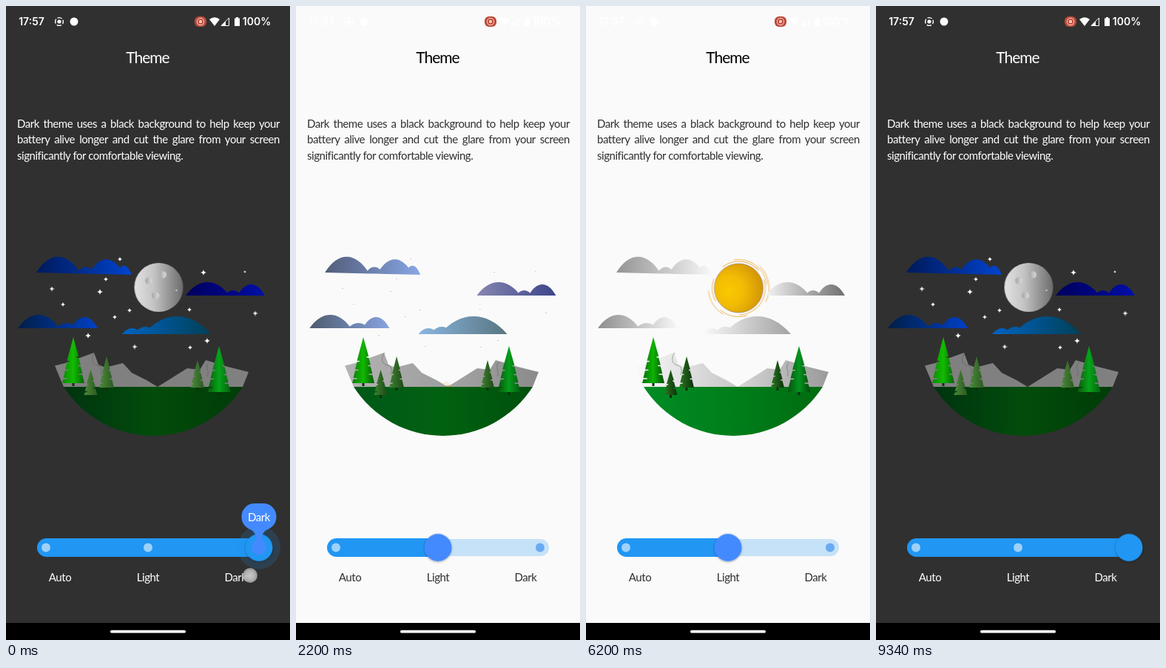
An HTML page that plays this animation: 384x854 px, repeating every 9540 ms.

```html
<!DOCTYPE html>
<html lang="en">
<head>
<meta charset="utf-8">
<title>Theme</title>
<style>
@property --theme { syntax: '<percentage>'; inherits: true; initial-value: 0%; }
@property --text { syntax: '<percentage>'; inherits: true; initial-value: 0%; }
@property --day { syntax: '<percentage>'; inherits: true; initial-value: 0%; }
@property --land { syntax: '<percentage>'; inherits: true; initial-value: 0%; }
@property --drift { syntax: '<number>'; inherits: true; initial-value: 0; }
@property --x { syntax: '<number>'; inherits: true; initial-value: 342; }
@property --press { syntax: '<number>'; inherits: true; initial-value: 0; }

html, body { margin: 0; width: 100%; height: 100%; overflow: hidden; }
#stage {
  --ink: color-mix(in srgb, #303030 var(--text), #fff);
  position: relative; width: 100%; height: 100%; overflow: hidden;
  background: color-mix(in srgb, #fafafa var(--theme), #303030);
  font: 15px Lato, 'Open Sans', sans-serif; letter-spacing: -.45px;
}
#stage, .loop { animation-duration: 9540ms; animation-timing-function: linear; animation-iteration-count: infinite; }
#stage { animation-name: theme, text, day, land, drift, slide, press; }
svg { position: absolute; left: 0; top: 0; width: 384px; height: 854px; }
svg text { text-anchor: middle; }
p { position: absolute; left: 15px; top: 148px; width: 355px; margin: 0; line-height: 21.4px; color: var(--ink); }
p span { display: block; white-space: nowrap; }
p span:not(:last-child) { text-align: justify; text-align-last: justify; }
.sky stop { stop-color: color-mix(in srgb, var(--d) var(--day), var(--n)); }
.land stop { stop-color: color-mix(in srgb, var(--d) var(--land), var(--n)); }
.title { font-size: 21px; letter-spacing: -1px; fill: color-mix(in srgb, #000 var(--theme), #fff); }
.label { fill: var(--ink); }
.status { font: 600 14px Inter, Roboto, sans-serif; letter-spacing: 0; }
.cloud { transform: translateX(calc(var(--drift) * var(--dx))); }
.active { width: calc((var(--x) - 42) * 1px); }
.knob { transform: translate(calc(var(--x) * 1px), 729.5px); }
.halo { opacity: calc(var(--press) * .17); transform: scale(var(--press)); }
.paddle { transform: scale(var(--press)); }
.disc { fill: color-mix(in srgb, #448aff var(--theme), #2196f3); filter: drop-shadow(0 1px 1.5px rgba(0,0,0,.3)); animation-name: disc; }
.sun { animation-name: sun; }
.moon { animation-name: moon; }
.star { animation-name: star; }
.star.early { animation-name: early; }
.fleck { animation-name: fleck; }
.at-dark { animation-name: at-dark; }
.at-light { animation-name: at-light; }
.at-dark, .at-light { animation-timing-function: step-end; }
.touch { animation-name: touch-place; animation-timing-function: step-end; }
.touch circle { animation-name: touch-show; }

@keyframes theme {
  0%, 10.69% { --theme: 0%; }
  12.79%, 66.7% { --theme: 100%; }
  68.79%, 100% { --theme: 0%; }
}
@keyframes text {
  0%, 10.69% { --text: 0%; }
  11.95% { --text: 18%; }
  13% { --text: 45%; }
  14.88%, 66.7% { --text: 100%; }
  68.55% { --text: 96%; }
  71.07%, 100% { --text: 0%; }
}
@keyframes day {
  0%, 11.11% { --day: 0%; }
  23.06% { --day: 55%; }
  33%, 67.01% { --day: 100%; }
  81.76% { --day: 86%; }
  94%, 100% { --day: 0%; }
}
@keyframes land {
  0%, 11.11% { --land: 0%; }
  23.06% { --land: 42%; }
  35%, 67.01% { --land: 100%; }
  81.76% { --land: 68%; }
  94%, 100% { --land: 0%; }
}
@keyframes drift {
  0%, 11.11% { --drift: 0; }
  23.06% { --drift: .17; }
  27.78% { --drift: 1.8; }
  40.36%, 67.01% { --drift: 0; }
  68.55% { --drift: .03; }
  75.47% { --drift: .33; }
  81.76% { --drift: 1; }
  84.49% { --drift: 1.75; }
  85.95% { --drift: 1.3; }
  96.44%, 100% { --drift: 0; }
}
@keyframes slide {
  0%, 9.01% { --x: 342; }
  9.8%, 65.9% { --x: 192; }
  66.7%, 100% { --x: 342; }
}
@keyframes press {
  0%, .73% { --press: 1; }
  1.9%, 7.97% { --press: 0; }
  9.01%, 13% { --press: 1; }
  14.26%, 65.3% { --press: 0; }
  66.3%, 69.6% { --press: 1; }
  70.86%, 100% { --press: 0; }
}
@keyframes disc {
  0%, 65.5% { transform: scale(1); }
  66.3%, 69% { transform: scale(0); }
  70.5%, 100% { transform: scale(1); }
}
@keyframes sun {
  0%, 21.8% { transform: translate(206.5px, 540px) scale(.5) rotate(-125deg); }
  40.36%, 67.01% { transform: translate(206.5px, 380px) scale(1) rotate(0deg); }
  87.46%, 100% { transform: translate(206.5px, 540px) scale(.5) rotate(-125deg); }
}
@keyframes moon {
  0%, 11.11% { transform: translate(206.5px, 379px) scale(1); }
  23.06%, 85.95% { transform: translate(206.5px, 540px) scale(.5); }
  97.2%, 100% { transform: translate(206.5px, 379px) scale(1); }
}
@keyframes star {
  0%, 11.11% { opacity: 1; }
  23.06% { opacity: .6; }
  28%, 76% { opacity: 0; }
  81.76% { opacity: .35; }
  92%, 100% { opacity: 1; }
}
@keyframes early {
  0%, 11.11% { opacity: 1; }
  23.06% { opacity: .6; }
  28%, 76% { opacity: 0; }
  81.76% { opacity: .85; }
  86%, 100% { opacity: 1; }
}
@keyframes fleck {
  0%, 10.69% { opacity: 0; }
  12.79%, 66.7% { opacity: 1; }
  68.79%, 100% { opacity: 0; }
}
@keyframes at-dark {
  0% { visibility: visible; }
  9.4% { visibility: hidden; }
  66.3%, 100% { visibility: visible; }
}
@keyframes at-light {
  0% { visibility: hidden; }
  9.4% { visibility: visible; }
  66.3%, 100% { visibility: hidden; }
}
@keyframes touch-place {
  0% { transform: translate(330px, 767px); }
  4% { transform: translate(193px, 771px); }
  40%, 100% { transform: translate(351px, 748px); }
}
@keyframes touch-show {
  0%, .73% { opacity: .85; }
  1.5%, 7.1% { opacity: 0; }
  7.4%, 13% { opacity: .9; }
  13.7%, 65% { opacity: 0; }
  65.3%, 69.3% { opacity: .9; }
  70%, 100% { opacity: 0; }
}
</style>
</head>
<body>
<div id="stage">
<svg viewBox="0 0 384 854">
  <defs>
    <g id="sky" class="sky"></g>
    <g id="land" class="land"></g>
    <linearGradient id="moonFill">
      <stop offset="0" stop-color="#e2e2e2"/><stop offset=".4" stop-color="#c4c4c4"/><stop offset="1" stop-color="#6c6c6c"/>
    </linearGradient>
    <linearGradient id="crater">
      <stop offset="0" stop-color="#a4a4a4"/><stop offset="1" stop-color="#dcdcdc"/>
    </linearGradient>
    <radialGradient id="sunFill" cx=".3" cy=".55" r=".75">
      <stop offset="0" stop-color="#f9c900"/><stop offset=".4" stop-color="#f2bc04"/><stop offset="1" stop-color="#cf9006"/>
    </radialGradient>
    <radialGradient id="touchFill">
      <stop offset="0" stop-color="#e4e4e4"/><stop offset=".65" stop-color="#cacaca"/><stop offset="1" stop-color="#a2a2a2"/>
    </radialGradient>
    <clipPath id="track"><rect x="42" y="717" width="300" height="25" rx="12.500"/></clipPath>
  </defs>

  <g fill="#fff" class="status">
    <text x="34.5" y="26">17:57</text>
    <circle cx="72" cy="21" r="5.4" fill="none" stroke="#fff" stroke-width="1.4" stroke-dasharray="6.4 2.08" stroke-dashoffset="3.2"/>
    <circle cx="72" cy="21" r="2.6"/>
    <circle cx="92" cy="21" r="5.5"/>
    <rect x="255" y="14" width="16" height="14" rx="6" fill="#bd4838"/>
    <circle cx="263" cy="21" r="4.6" fill="none" stroke="#f0c8be" stroke-width="1.1"/>
    <circle cx="263" cy="21" r="2.2" fill="#f0c8be"/>
    <path d="M275 18Q282 12.500 289 18L282 27Z"/>
    <path d="M301.500 16V26.500H291Z" fill="none" stroke="#fff"/>
    <path d="M297 20.500V26.500H291Z"/>
    <path d="M309 16.500h2v-1.500h3v1.500h2v10.500h-7z"/>
    <text x="339" y="26">100%</text>
  </g>
  <text class="title" x="191.500" y="76.500">Theme</text>

  <g id="stars"></g>
  <g class="loop sun">
    <g fill="none" stroke="#eeb550" stroke-width=".9">
      <circle r="36" pathLength="100" stroke-dasharray="14 9 24 6 30 17" transform="rotate(150)"/>
      <circle r="38.500" pathLength="100" stroke-dasharray="26 22 16 36" transform="rotate(-100)"/>
      <circle r="41" pathLength="100" stroke-dasharray="20 26 15 39" transform="rotate(-45)"/>
    </g>
    <circle r="33" fill="url(#sunFill)" stroke="#5a4668" stroke-opacity=".6" stroke-width=".7"/>
  </g>
  <g class="loop moon">
    <circle r="33" fill="url(#moonFill)"/>
    <g fill="url(#crater)"><circle cx="-13.500" cy="-9" r="4.800"/><circle cx="5.500" cy="-17" r="4.800"/><circle cx="-4.500" cy="11" r="5"/></g>
    <circle cx="24" cy="4" r="1" fill="#e8e8e8"/>
  </g>
  <g id="clouds"></g>

  <path fill="url(#hillL)" d="M66 484.500L80 481L119 467L125 483L134 487L158 481L170 494L190 504L205 513H78Z"/>
  <path fill="url(#hillR)" d="M205 513L245 488L262 490L270 477L300 486L328 493L320 513Z"/>
  <g fill="none" stroke="#555" stroke-width=".8" stroke-opacity=".6">
    <path d="M120 467C113 477 118 483 124 484S130 492 128 497"/>
    <path d="M274 480C268 487 276 492 272 499"/>
  </g>
  <path fill="url(#ground)" d="M78 513H320A144 144 0 0 1 78 513Z"/>
  <g id="trees"></g>

  <rect x="42" y="718" width="300" height="23" rx="11.500" fill="#2196f3" fill-opacity=".24"/>
  <g clip-path="url(#track)"><rect class="active" x="42" y="717" width="300" height="25" fill="#2196f3"/></g>
  <g fill="#fff" fill-opacity=".56">
    <circle cx="54" cy="729.500" r="6"/><circle cx="192" cy="729.500" r="6"/>
    <circle class="loop at-dark" cx="330" cy="729.500" r="6"/>
  </g>
  <circle class="loop at-light" cx="330" cy="729.500" r="6" fill="#2d84ee" fill-opacity=".6"/>
  <g class="label">
    <text x="73" y="774.500">Auto</text><text x="192" y="774.500">Light</text><text x="310.500" y="774.500">Dark</text>
  </g>
  <g class="knob">
    <circle class="halo" r="29" fill="#2196f3"/>
    <circle class="loop disc" r="18.500"/>
    <g class="paddle" fill="#448aff">
      <circle r="10"/>
      <path d="M-12 -25C-7 -22 -4 -18 -4 -13C-4 -10 -7 -8 -9 -4H9C7 -8 4 -10 4 -13C4 -18 7 -22 12 -25Z"/>
      <g class="loop at-dark"><rect x="-23.500" y="-59.500" width="47" height="36" rx="17.500"/><text y="-36" fill="#fff">Dark</text></g>
      <g class="loop at-light"><rect x="-25" y="-59.500" width="50" height="36" rx="17.500"/><text y="-36" fill="#fff">Light</text></g>
    </g>
  </g>
  <g class="loop touch"><circle class="loop" r="10" fill="url(#touchFill)"/></g>

  <rect y="831" width="384" height="23"/>
  <rect x="141" y="840.800" width="102" height="3.700" rx="1.850" fill="#fff"/>
</svg>
<p><span>Dark theme uses a black background to help keep your</span><span>battery alive longer and cut the glare from your screen</span><span>significantly for comfortable viewing.</span></p>
</div>
<script>
const put = (id, markup) => { document.getElementById(id).innerHTML = markup; };

// Each stop is a pair: night colour, day colour.
const tints = {
  sky: {
    cloudA: ['#001a5c #949494', '#0044d0 #f8f8f8'],
    cloudB: ['#00005c #f4f4f4', '#0010a8 #707070'],
    cloudC: ['#001e48 #8e8e8e', '#0040c8 #f8f8f8'],
    cloudD: ['#0064c4 #fafafa', '#004058 #a2a2a2'],
  },
  land: {
    hillL: ['#808080 #fafafa', '#808080 #c6c6c6'],
    hillR: ['#808080 #d6d6d6', '#808080 #9a9a9a'],
    ground: ['#00340f #008c24', '#024c0a #007e1a', '#003c08 #006c10'],
    pineL: ['#0a8a04 #067008', '#12bc00 #0eb400', '#066404 #044c04'],
    pineR: ['#085a0c #06500c', '#06a41a #049420', '#046410 #034c0c'],
    sapling: ['#4c8a3c #2c7a20', '#2c5a20 #0c300c'],
  },
};
const gradient = ([id, stops]) =>
  `<linearGradient id="${id}">` + stops.map((pair, i) => {
    const [night, day] = pair.split(' ');
    return `<stop offset="${i / (stops.length - 1)}" style="--n:${night};--d:${day}"/>`;
  }).join('') + '</linearGradient>';
for (const group in tints) put(group, Object.entries(tints[group]).map(gradient).join(''));

const hump = (base, [a, b, h]) => {
  const side = (b - a) * 0.3, top = base - h * 1.333;
  return `M${a} ${base}C${a + side} ${top} ${b - side} ${top} ${b} ${base}Z`;
};
const cloud = (fill, dx, base, humps, tilt = '') =>
  `<g class="cloud" style="--dx:${dx}px"><path fill="url(#${fill})" transform="${tilt}" d="${humps.map(h => hump(base, h)).join('')}"/></g>`;
put('clouds',
  cloud('cloudA', -11, 359, [[41, 101, 22], [96, 120, 9], [112, 160, 20], [149, 170, 12]], 'translate(0 -.9) skewY(1.300)') +
  cloud('cloudB', 8.5, 390, [[243, 302, 18], [296, 318, 7], [313, 350, 15]]) +
  cloud('cloudC', 13.5, 434, [[16, 72, 18], [68, 96, 7], [88, 124, 15]]) +
  cloud('cloudD', 49, 442, [[157, 184, 8], [173, 204, 10], [186, 277, 24]]));

const star = ([x, y, r, early]) =>
  `<g class="loop star ${early ? 'early' : ''}"><path transform="translate(${x} ${y}) scale(${r})" fill="#fff"
    d="M0 -1Q.12 -.12 1 0Q.12 .12 0 1Q-.12 .12 -1 0Q-.12 -.12 0 -1Z"/>
    <path class="loop fleck" fill="#888" d="M${x} ${y - 1}h${r * 0.6}l-${r * 0.4} 1.500z"/></g>`;
put('stars', [
  [154, 341, 3], [135, 368, 3], [62, 381, 3.5], [127, 385, 4], [77, 402, 3],
  [147, 419, 3], [167, 410, 3, 1], [111, 444, 4], [174, 459, 3.5, 1], [267, 359, 4],
  [323, 358, 2], [337, 414, 3.5, 1], [248, 409, 3], [249, 460, 3], [272, 451, 4],
].map(star).join(''));

// A bulging pine with thin slits cut alternately into its two edges.
function pine(x, top, foot, half, fill, slits) {
  const h = foot - top;
  const width = f => half * f ** 0.85;
  const edge = side => {
    const pts = [];
    for (let i = 0; i < slits; i++) {
      const f = 0.42 + (i + (side > 0 ? 0 : 0.5)) * 0.56 / slits;
      const y = top + h * f, w = width(f) * side;
      pts.push([x + w, y], [x + w * 0.6, y + 0.3], [x + w * 0.6, y + 1.5], [x + w, y + 1.8]);
    }
    return pts;
  };
  const pts = [[x, top], ...edge(1), [x + half, foot], [x - half, foot], ...edge(-1).reverse()];
  return `<rect x="${x - 1.5}" y="${foot - 1}" width="3" height="5" fill="#10300c"/>
    <path fill="url(#${fill})" d="M${pts.map(p => p.map(n => n.toFixed(1)).join(' ')).join('L')}Z"/>`;
}
put('trees',
  pine(136, 472, 514, 10, 'sapling', 2) + pine(114.5, 490, 524, 9, 'sapling', 2) +
  pine(91, 446, 508, 15, 'pineL', 3) +
  pine(259, 477, 514, 9, 'sapling', 2) + pine(288, 458, 520, 15.5, 'pineR', 3));
</script>
</body>
</html>
```
